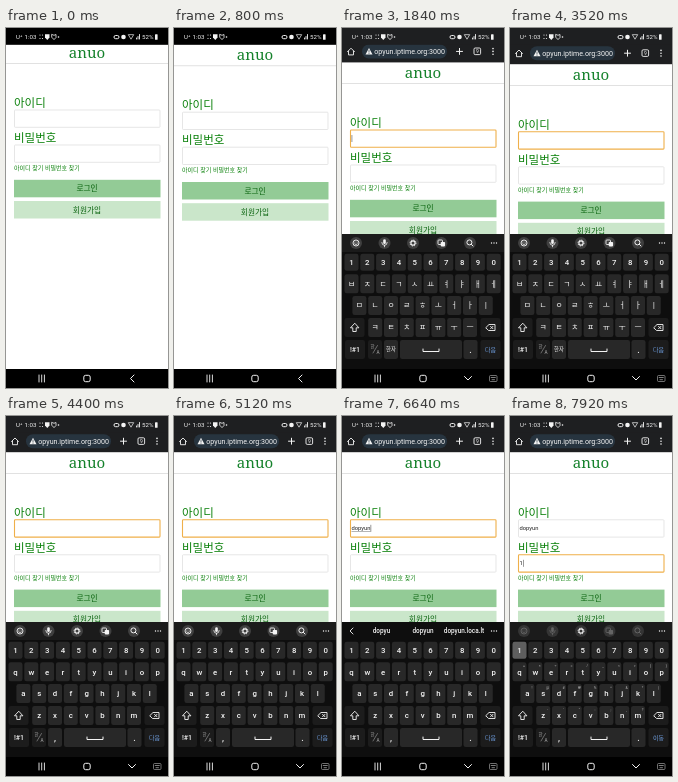
Recreate the animation shown at these times as an HTML page. Size 162 by 360 pixels, loop 8000 ms.

```html
<!DOCTYPE html>
<html lang="ko">
<head>
<meta charset="utf-8">
<style>
html, body { margin: 0; width: 100%; height: 100%; overflow: hidden; background: #000; }
svg { display: block; width: 100vw; height: 100vh; font-family: Roboto, "Noto Sans CJK KR", "Noto Sans CJK", sans-serif; }
.ko { font-family: "Noto Sans CJK KR", "Noto Sans CJK", sans-serif; font-weight: 500; }
.logo { font-family: "Noto Serif", serif; }
.keys { font-weight: 500; }
</style>
</head>
<body>
<svg id="stage" viewBox="0 0 162 360" preserveAspectRatio="none"></svg>
<script>
const LOOP = 8000, FOCUS = 1560, TYPE = 5280, STEP = 240, NEXT = 7100, PASS = 7800;
const STATUS = 16.6, BAR = 19.6;
const ID = "dopyun", HOST = "opyun.iptime.org:3000";
const GREEN = "#0a800a", WHITE = "#f4f4f4", CHROME = "#1e1f21";
const stage = document.getElementById("stage");

function el(parent, tag, attrs = {}) {
  const node = document.createElementNS("http://www.w3.org/2000/svg", tag);
  for (const k in attrs) node.setAttribute(k, attrs[k]);
  return parent.appendChild(node);
}
const group = (parent, more) => el(parent, "g", more);
const rect = (p, x, y, width, height, fill, more) => el(p, "rect", { x, y, width, height, fill, ...more });
const disc = (p, cx, cy, r, fill, more) => el(p, "circle", { cx, cy, r, fill, ...more });
const line = (p, d, width = 0.9, stroke = WHITE) =>
  el(p, "path", { d, fill: "none", stroke, "stroke-width": width, "stroke-linecap": "round", "stroke-linejoin": "round" });
// y is the middle of the text
function text(p, str, x, y, size, fill = WHITE, anchor = "middle", more = {}) {
  const node = el(p, "text", { x, y: y + size * 0.36, "font-size": size, fill, "text-anchor": anchor, ...more });
  node.textContent = str;
  return node;
}
const show = (node, on) => node.setAttribute("display", on ? "inline" : "none");
const move = (node, y) => node.setAttribute("transform", `translate(0 ${y})`);

// Web page
rect(stage, 0, 0, 162, 360, "#fff");
const page = group(stage);
const ko = { class: "ko" };
text(page, "anuo", 81, 24.9, 15, "#16822c", "middle", { class: "logo" });
rect(page, 0, 35.2, 162, 0.8, "#dadada");
text(page, "아이디", 8, 75, 11.5, GREEN, "start", ko);
text(page, "비밀번호", 8, 110, 11.5, GREEN, "start", ko);
const boxes = [82, 117].map(y =>
  rect(page, 8.5, y, 145.5, 17.3, "#fff", { rx: 0.8 }));
const idText = text(page, "", 9.5, 90.6, 5.8, "#222", "start");
const passText = text(page, "1", 9.5, 125.6, 5.8, "#222", "start");
const underline = rect(page, 9.5, 93.5, 1, 0.4, "#444");
const caret = rect(page, 9.5, 87, 0.5, 7, "#333");
text(page, "아이디 찾기 비밀번호 찾기", 8, 139.8, 6, GREEN, "start", ko);
rect(page, 8, 151.8, 146.5, 17.5, "#93cb96");
text(page, "로그인", 81, 160.6, 7.7, "#08620d", "middle", ko);
rect(page, 8, 173, 146.5, 17.5, "#cae6ca");
text(page, "회원가입", 81, 181.8, 7.7, "#08620d", "middle", ko);
const touch = disc(stage, 109, 91, 4.6, "#fff", { stroke: "#b9bcc4", "stroke-width": 0.8 });

// Address bar
const barBack = rect(stage, 0, 0, 162, STATUS, CHROME);
const bar = group(stage);
line(bar, "M5.5 25.5L9 22L12.5 25.5M6.5 25V28.7H11.5V25");
rect(bar, 20, 18.3, 85, 14, "#27343f", { rx: 7 });
el(bar, "path", { d: "M23.5 28.2L27 21.8L30.5 28.2Z", fill: WHITE });
line(bar, "M27 24V26M27 27.2V27.3", 0.7, "#27343f");
text(bar, HOST, 32.3, 25.2, 7.1, WHITE, "start");
line(bar, "M114.5 25.2H120.5M117.5 22.2V28.2", 1);
rect(bar, 132, 21.8, 6.6, 6.6, "none", { rx: 1.2, stroke: WHITE, "stroke-width": 0.9 });
text(bar, "9", 135.3, 25.1, 5);
for (const y of [22.4, 25.2, 28]) disc(bar, 151, y, 0.8, WHITE);

// Status bar
const statusBack = rect(stage, 0, 0, 162, STATUS, "#000");
text(stage, "U⁺", 10, 9, 6, WHITE, "start");
text(stage, "1:03", 18.5, 9, 6.2, WHITE, "start");
for (const x of [34, 36.5]) for (const y of [7, 10.5]) disc(stage, x, y, 0.6, WHITE);
el(stage, "path", { d: "M39 6.2H43.5V9.5L41.3 12L39 9.5Z", fill: WHITE });
line(stage, "M46 6.5L48 7.3L50 6.5V9.5L48 11.6L46 9.5Z", 0.8);
disc(stage, 52.5, 9, 0.8, WHITE);
rect(stage, 108, 7.5, 5, 3.2, "none", { rx: 1.6, stroke: WHITE, "stroke-width": 1 });
disc(stage, 117.5, 9, 2.3, WHITE);
line(stage, "M122.5 7L125 11.2L127.5 7Z", 0.7);
line(stage, "M130.5 11V10M132 11V8.5M133.5 11V6.5", 0.9);
text(stage, "52%", 136, 9, 6.2, WHITE, "start");
rect(stage, 149, 6.2, 2.6, 5.6, WHITE, { rx: 0.6 });

// Keyboard
const board = group(stage, { class: "keys" });
const KEY = "#282828", SIDE = "#1c1c1c", GRAY = "#a0a0a0";
rect(board, 0, 206, 162, 154, "#0e0e0e");
const toolBack = rect(board, 0, 206, 162, 18, "#1b1b1b");
const spots = {};
function key(p, label, x, y, w = 14, h = 19, size = 7.8, fill = KEY) {
  rect(p, x - w / 2, y - h / 2, w, h, fill, { rx: 2.2 });
  spots[label] = [x, y, w, h];
  return text(p, label, x, y, size);
}
function row(p, chars, first, y, draw = key) {
  [...chars].forEach((c, i) => draw(p, c, first + i * 15.8, y));
}
const ROWS = [[9.5, 255.7], [17.4, 277.5], [33.2, 299.5]];
function layout(p, lines, draw) {
  lines.forEach((chars, i) => row(p, chars, ...ROWS[i], draw));
}
row(board, "1234567890", 9.5, 234.2, (p, c, x, y) => key(p, c, x, y, 14, 17));
const korean = group(board), latin = group(board), symbols = group(board);
layout(korean, ["ㅂㅈㄷㄱㅅㅛㅕㅑㅐㅔ", "ㅁㄴㅇㄹㅎㅗㅓㅏㅣ", "ㅋㅌㅊㅍㅠㅜㅡ"]);
key(korean, "한자", 49, 321.5, 14, 19, 5.4);
layout(latin, ["qwertyuiop", "asdfghjkl", "zxcvbnm"]);
key(latin, ",", 49, 321.5, 14, 19, 9);
layout(symbols, ["+×÷=/_<>[]", "!@#₩%^&*()", "-'\":;,?"].map((s, i) => s.slice(0, 10 - i)),
  (p, c, x, y) => text(p, c, x + 4.5, y - 6, 3.6, GRAY));
for (const x of [12.5, 148.5]) rect(board, x - 10, 290, 20, 19, SIDE, { rx: 2.2 });
line(board, "M12.5 295.5L8.5 299.8H10.8V303.5H14.2V299.8H16.5Z");
line(board, "M144 299.5L147 296.5H153V302.5H147ZM148.5 298.3L151 300.8M151 298.3L148.5 300.8", 0.9);
key(board, "!#1", 13, 321.5, 20, 19, 7, SIDE);
const lang = [33, 321.5, 14, 19];
rect(board, 26, 312, 14, 19, SIDE, { rx: 2.2 });
line(board, "M31 325L35.5 317.5", 0.6, GRAY);
text(board, "한", 30.5, 318.5, 4.6, GRAY);
text(board, "A", 36, 324.5, 4.6, GRAY);
rect(board, 58, 312, 62, 19, KEY, { rx: 2.2 });
line(board, "M81 321V323.5H97V321", 1);
key(board, ".", 128.5, 321.5, 14, 19, 9);
const action = key(board, "다음", 148.5, 321.5, 20, 19, 6, SIDE);
action.setAttribute("fill", "#6f9fe0");
const press = rect(board, 0, 0, 14, 19, "#fff", { rx: 2.2, opacity: 0.25 });

// Toolbar
const discs = group(board), tools = group(board), gear = group(board), words = group(board);
for (const x of [14, 42.5, 71, 99.5, 128]) disc(discs, x, 215, 6, "#3f3f3f");
disc(tools, 14, 215, 3, "none", { stroke: WHITE, "stroke-width": 0.9 });
line(tools, "M12.6 216Q14 217.4 15.4 216M12.9 214V214.1M15.1 214V214.1", 0.8);
rect(tools, 41.2, 211.2, 2.6, 4.8, WHITE, { rx: 1.3 });
line(tools, "M39.8 214.5Q40 217.3 42.5 217.3Q45 217.3 45.2 214.5M42.5 217.3V218.8", 0.8);
rect(tools, 96, 212, 4.5, 4.5, "none", { rx: 0.8, stroke: WHITE, "stroke-width": 0.9 });
rect(tools, 98.7, 214, 4.4, 4.4, WHITE, { rx: 0.8 });
disc(tools, 127.4, 214.4, 2.5, "none", { stroke: WHITE, "stroke-width": 1 });
line(tools, "M129.4 216.4L131 218", 1);
disc(gear, 71, 215, 2.1, "none", { stroke: WHITE, "stroke-width": 1.1 });
disc(gear, 71, 215, 3, "none", { stroke: WHITE, "stroke-width": 0.9, "stroke-dasharray": "1.18 1.18" });
for (const x of [149.5, 152, 154.5]) disc(board, x, 215, 0.7, WHITE);
line(words, "M11 212L8 215L11 218");
const hints = [39.5, 81, 122].map(x => text(words, "", x, 214.7, 6.4));

// Navigation bar
rect(stage, 0, 341, 162, 19, "#000");
line(stage, "M33 347V354M35.7 347V354M38.4 347V354", 0.9);
rect(stage, 77.8, 347.3, 6.4, 6.4, "none", { rx: 1.8, stroke: WHITE, "stroke-width": 1 });
const back = line(stage, "M128 347L124.5 350.5L128 354", 1);
const hide = group(stage);
line(hide, "M122.5 348.5L126 352L129.5 348.5", 1);
rect(hide, 147.5, 347.5, 7.5, 6, "none", { rx: 1, stroke: GRAY, "stroke-width": 0.7 });
line(hide, "M149.2 349.5H153.3M150 351.7H152.5", 0.8, GRAY);

// Piecewise linear value at t
function ramp(t, points) {
  if (t <= points[0][0]) return points[0][1];
  for (let i = 1; i < points.length; i++) {
    const [a, u] = points[i - 1], [b, v] = points[i];
    if (t < b) return u + (v - u) * (t - a) / (b - a);
  }
  return points[points.length - 1][1];
}

function pressed(t) {
  const i = Math.floor((t - TYPE) / STEP);
  if (i >= 0 && i < ID.length && (t - TYPE) % STEP < 110) return spots[ID[i]];
  const taps = [[3920, lang], [NEXT - 60, spots["다음"]], [PASS, spots["1"]]];
  const tap = taps.find(([at]) => t >= at && t < at + 150);
  return tap && tap[1];
}

function draw(t) {
  const reveal = ramp(t, [[1620, 0], [1840, BAR - 1.8], [2000, BAR]]);
  const scroll = ramp(t, [[160, 0], [400, 2.2]]);
  const focus = t < FOCUS ? -1 : t < NEXT ? 0 : 1;
  const open = t >= 1660;
  move(page, scroll + reveal);
  move(bar, reveal - BAR);
  barBack.setAttribute("height", STATUS + reveal);
  statusBack.setAttribute("fill", open ? CHROME : "#000");
  show(bar, reveal > 0);

  touch.setAttribute("opacity", ramp(t, [[1360, 0], [1480, 1], [1600, 0.85], [1720, 0]]));

  boxes.forEach((box, i) => {
    box.setAttribute("stroke", i === focus ? "#efb04a" : "#dcdcdc");
    box.setAttribute("stroke-width", i === focus ? 1.1 : 0.7);
  });

  const count = Math.max(0, Math.min(ID.length, Math.floor((t - TYPE) / STEP) + 1));
  const typed = ID.slice(0, count);
  idText.textContent = typed;
  const width = count ? idText.getComputedTextLength() : 0;
  underline.setAttribute("width", width);
  show(underline, count > 0 && focus === 0);
  show(passText, t >= PASS);

  const since = t >= PASS ? t - PASS : focus === 1 ? t - NEXT
    : count ? t - TYPE - (count - 1) * STEP : t - FOCUS;
  show(caret, focus >= 0 && since % 1000 < 500);
  caret.setAttribute("x", 9.7 + (focus === 1 ? (t >= PASS ? 3.3 : 0) : width));
  caret.setAttribute("y", focus === 1 ? 122 : 87);

  show(board, open);
  move(board, ramp(t, [[1660, 154], [1720, 65], [1800, 0]]));
  show(back, !open);
  show(hide, open);
  show(korean, t < 4000);
  show(latin, t >= 4000);
  show(symbols, focus === 1);
  const suggest = count > 0 && focus === 0;
  show(words, suggest);
  for (const part of [toolBack, discs, tools, gear]) show(part, !suggest);
  tools.setAttribute("opacity", focus === 1 ? 0.25 : 1);
  discs.setAttribute("opacity", focus === 1 ? 0.7 : 1);
  action.textContent = focus === 1 ? "이동" : "다음";
  hints[0].textContent = typed.slice(0, -1);
  hints[1].textContent = typed;
  hints[2].textContent = count === ID.length ? ID + ".loca.lt" : "";

  const spot = pressed(t);
  show(press, !!spot);
  if (spot) {
    const [x, y, w, h] = spot;
    press.setAttribute("x", x - w / 2);
    press.setAttribute("y", y - h / 2);
    press.setAttribute("width", w);
    press.setAttribute("height", h);
  }
}

const start = performance.now();
function tick() {
  draw((performance.now() - start) % LOOP);
  requestAnimationFrame(tick);
}
tick();
</script>
</body>
</html>
```
